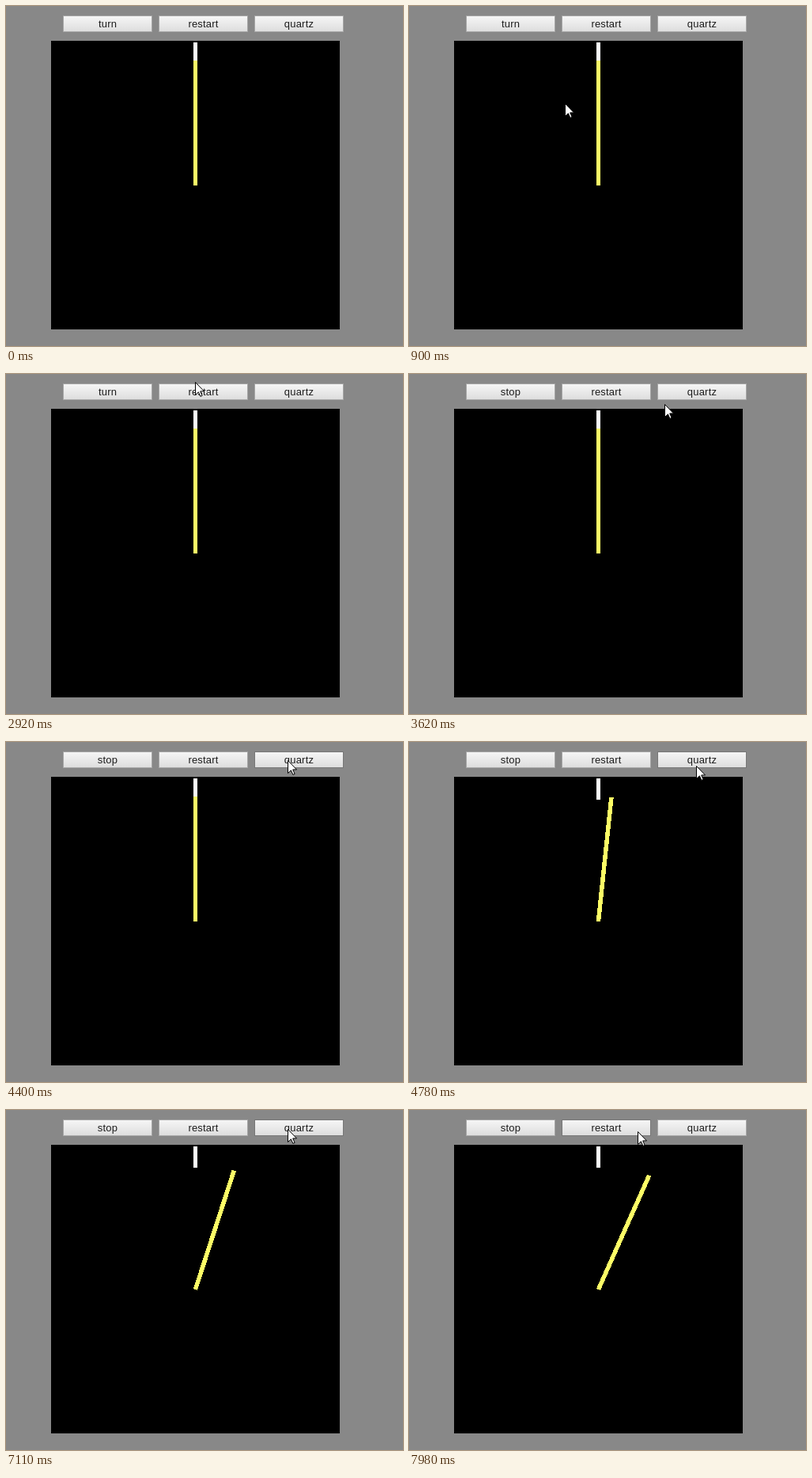
Animation of 502 by 430 pixels, one loop 8000 ms. Source, as an HTML page:

```html
<!DOCTYPE html>
<html lang="en">
<head>
<meta charset="utf-8">
<title>Quartz clock hand</title>
<style>
  html, body { margin: 0; width: 100%; height: 100%; overflow: hidden; background: #888; }
  svg { display: block; width: 502px; height: 430px; }
  text { font: 13px "Liberation Sans", Arial, sans-serif; letter-spacing: .2px; text-anchor: middle; fill: #1c1c1c; }
</style>
</head>
<body>
<svg viewBox="0 0 502 430">
  <defs>
    <linearGradient id="face" x2="0" y2="1">
      <stop offset="0" stop-color="#f6f6f6"/>
      <stop offset="1" stop-color="#dddddd"/>
    </linearGradient>
  </defs>
  <rect width="502" height="430" fill="#888"/>
  <g id="buttons"></g>
  <rect x="57" y="44" width="365" height="365"/>
  <rect x="237" y="46" width="5" height="27" fill="#fff"/>
  <rect id="hand" x="236.7" y="69" width="5.5" height="158" fill="#ff6" shape-rendering="crispEdges"/>
  <path id="cursor" d="M.5 .5V16.5L4.4 12.8 6.9 18.4 9.1 17.4 6.7 11.9H11.5Z" fill="#fff" stroke="#000"/>
</svg>
<script>
const LOOP = 8000, START = 182, STEP = 77.9;
const FIRST_TICK = 57, TICK_STEPS = 13, STOP_STEP = 39;
const $ = id => document.getElementById(id);

// Pointer moves: first step, last step, x and y reached; it rests in between
const entry = [391, 416];
const moves = [
  [0, 6, 198, 130], [7, 12, 196, 113],
  [18, 23, 267, 36], [23, 27, 340, 22],
  [28, 35, 239, 10], [35, 39, 150, 20],
  [40, 44, 323, 38], [44, 48, 355, 22],
  [53, 59, 363, 30], [62, 67, 357, 26],
  [87, 89, 354, 22], [92, 96, 340, 26], [98, 100, 289, 27]
];

const buttons = ["turn", "restart", "quartz"].map((label, i) => {
  const add = (tag, attrs) => {
    const el = document.createElementNS("http://www.w3.org/2000/svg", tag);
    for (const key in attrs) el.setAttribute(key, attrs[key]);
    return $("buttons").appendChild(el);
  };
  const x = 72 + 121 * i;
  const box = add("rect", { x: x + .5, y: 12.5, width: 112, height: 20, fill: "url(#face)" });
  const text = add("text", { x: x + 56.5, y: 27 });
  text.textContent = label;
  return { x, box, text };
});

function pointerAt(step) {
  return moves.reduce(([x, y], [from, to, endX, endY]) => {
    const f = Math.min(1, Math.max(0, (step - from) / (to - from)));
    return [x + (endX - x) * f, y + (endY - y) * f];
  }, entry).map(Math.round);
}

function draw(t) {
  const step = Math.floor((t - START) / STEP);
  const visible = step >= 0;
  const [x, y] = pointerAt(step);
  $("cursor").setAttribute("transform", `translate(${x} ${y})`);
  $("cursor").setAttribute("visibility", visible ? "visible" : "hidden");

  for (const b of buttons) {
    const hover = visible && x >= b.x && x < b.x + 113 && y >= 12 && y < 33;
    b.box.setAttribute("stroke", hover ? "#777" : "#a6a6a6");
  }
  buttons[0].text.textContent = step < STOP_STEP ? "turn" : "stop";

  const ticks = Math.max(0, Math.floor((step - FIRST_TICK) / TICK_STEPS) + 1);
  $("hand").setAttribute("transform", `rotate(${ticks * 6} 239.5 227)`);
}

const origin = performance.now();
function loop() {
  draw((performance.now() - origin) % LOOP);
  requestAnimationFrame(loop);
}
loop();
</script>
</body>
</html>
```
